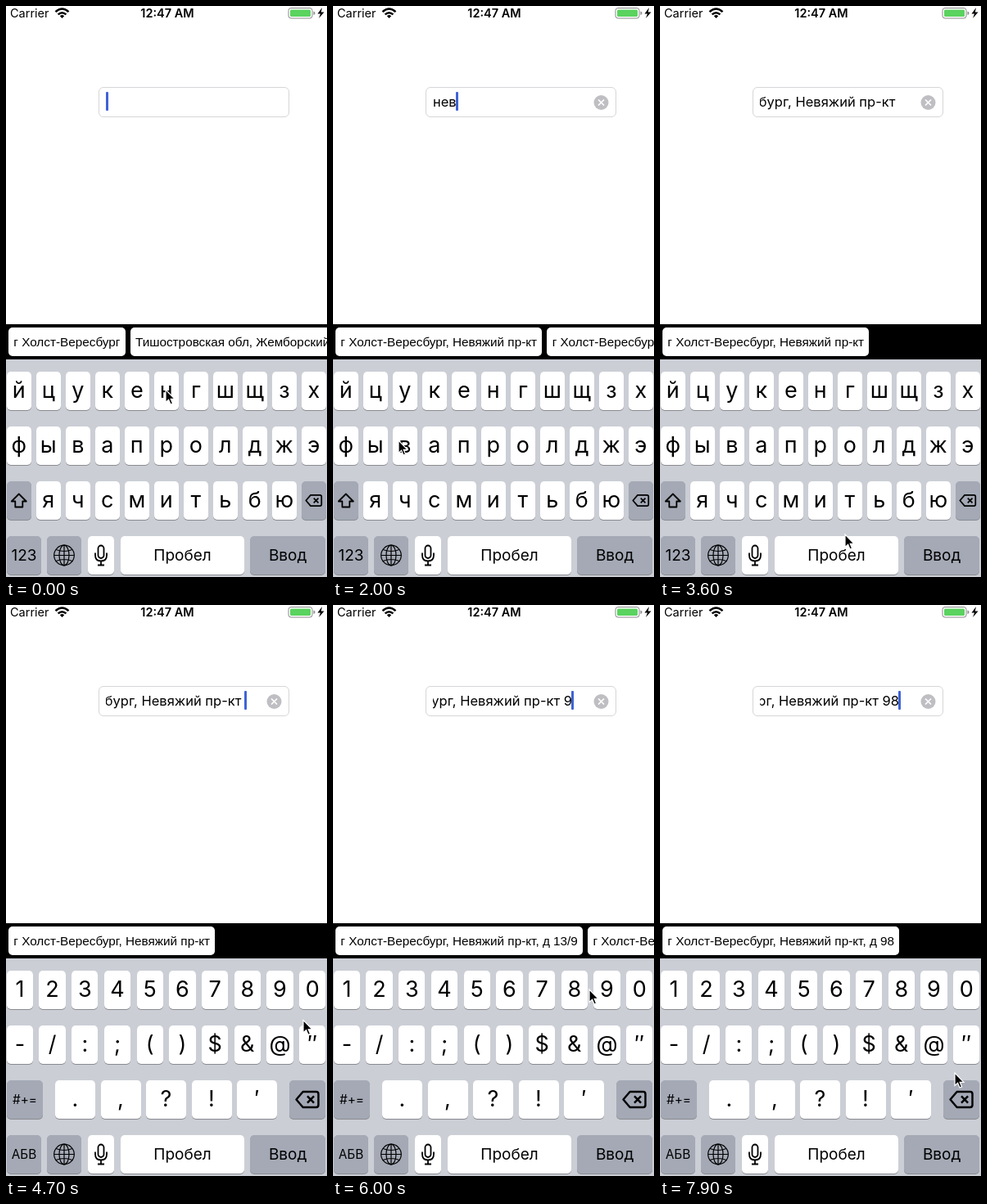
These frames come from a looping animation (392x698 px, 8 s). An HTML page:

```html
<!DOCTYPE html>
<html lang="ru">
<head>
<meta charset="utf-8">
<title>Address input</title>
<style>
html, body { margin: 0; width: 100%; height: 100%; overflow: hidden; background: #fff; }
#stage { position: relative; width: 392px; height: 698px; overflow: hidden; color: #000; font-family: Inter, Roboto, sans-serif; }
#stage div, #stage svg { position: absolute; box-sizing: border-box; white-space: pre; }
#stage svg { left: 0; top: 0; overflow: visible; }
.status { top: 0; line-height: 18px; font-size: 14.5px; }
#field { left: 113px; top: 98.5px; width: 233px; height: 37.5px; border: 1px solid #d6d6d8; border-radius: 6px; }
#clip { left: 122px; top: 104px; width: 171px; height: 27px; overflow: hidden; }
#typed { top: 0; line-height: 27px; font-size: 16.5px; }
#caret { top: 105px; width: 3px; height: 23px; border-radius: 1px; background: #3f63d6; }
#bar { left: 0; top: 389px; width: 392px; height: 43px; background: #000; overflow: hidden; }
#chips { left: 3px; top: 4px; display: flex; gap: 6px; }
#stage .chip { position: static; flex: none; height: 35px; padding: 0 6.3px; border-radius: 5px; background: #fff; line-height: 36px; font-family: "Liberation Sans", Arial, sans-serif; font-size: 15.3px; }
#board { left: 0; top: 432px; width: 392px; height: 266px; background: #cbced5; }
#letters, #numbers, #common { left: 0; top: 0; }
.key { height: 47px; line-height: 45px; text-align: center; font-size: 27px; background: #fff; border-radius: 5px; box-shadow: 0 1px #898b90; }
.key.gray { background: #a4a9b5; }
.key.word { line-height: 47px; font-size: 19px; }
.key.small { line-height: 48px; font-size: 15.3px; }
#popText { font: 38px Inter, sans-serif; text-anchor: middle; }
</style>
</head>
<body>
<div id="stage">
  <div class="status" style="left:5px">Carrier</div>
  <div class="status" style="left:97px;width:200px;text-align:center;font-weight:600">12:47 AM</div>
  <svg width="392" height="140">
    <g fill="none" stroke="#000" stroke-width="2.5">
      <path d="M60.5 7.2Q68.5 -.2 76.5 7.2M63.6 10.4Q68.5 6 73.4 10.4"/>
      <path d="M68.5 15L65.8 12.2Q68.5 10 71.2 12.2Z" fill="#000" stroke="none"/>
    </g>
    <rect x="345" y="2.5" width="29" height="12.5" rx="3" fill="#fff" stroke="#8b8b8b"/>
    <rect x="347" y="4.5" width="25" height="8.5" rx="1.5" fill="#5ad35f"/>
    <path d="M375.5 6.5q2 .5 2 2.2t-2 2.2z" fill="#8b8b8b"/>
    <path d="M386 2L380.5 9.5H384L382 15L388.5 7.5H384.8Z"/>
  </svg>
  <div id="field"></div>
  <div id="clip"><div id="typed"></div></div>
  <div id="caret"></div>
  <svg id="clear" width="392" height="140">
    <circle cx="327.5" cy="118" r="9" fill="#bfbfc3"/>
    <path d="M324 114.5l7 7m0-7l-7 7" stroke="#fff" stroke-width="1.7"/>
  </svg>
  <div id="bar"><div id="chips"></div></div>
  <div id="board">
    <div id="letters"></div>
    <div id="numbers"></div>
    <div id="common"></div>
  </div>
  <svg id="popup" width="392" height="698" style="filter:drop-shadow(0 1px 2px #0007)">
    <path id="popShape" fill="#fff"/><text id="popText"></text>
  </svg>
  <svg id="pointer" width="14" height="20">
    <path d="M0 0V15.5L3.6 12.2L6 18L8.6 16.9L6.2 11.3H11Z" stroke="#fff" stroke-width="1.2"/>
  </svg>
</div>
<script>
const $ = id => document.getElementById(id);
const LOOP = 8000;
const CITY = 'г Холст-Вересбург', STREET = CITY + ', Невяжий пр-кт';

// Keyboard: rows are 67px apart, measured from the board's top
const keys = {};
function addKey(group, label, row, x, w, style = '', icon = '') {
  const el = document.createElement('div');
  const y = 15 + row * 67;
  el.className = 'key ' + style;
  el.style.cssText = `left:${x}px;top:${y}px;width:${w}px`;
  if (icon) el.innerHTML = `<svg width="${w}" height="47" viewBox="${-w / 2} -23.5 ${w} 47" fill="none" stroke="#000" stroke-width="1.8" stroke-linejoin="round">${icon}</svg>`;
  else el.textContent = label;
  $(group).append(el);
  keys[label] = { el, x, y: y + 432, w };
}
const addRow = (group, labels, row, x, pitch, w) =>
  [...labels].forEach((c, i) => addKey(group, c, row, x + i * pitch, w));

const eraser = s => `<g transform="scale(${s})"><path d="M-10 0L-4 -7H8Q10 -7 10 -5V5Q10 7 8 7H-4ZM0 -3l6 6m0-6l-6 6"/></g>`;
const shift = '<path d="M0 -8L9 1H4.5V8H-4.5V1H-9Z"/>';
const globe = '<g stroke-width="1.2"><circle r="12.3"/><ellipse rx="6" ry="12.3"/><path d="M0 -12.3V12.3M-12.3 0H12.3M-10 -7Q0 -3 10 -7M-10 7Q0 3 10 7"/></g>';
const mic = '<rect x="-3.5" y="-12" width="7" height="15.5" rx="3.5"/><path d="M-7 -3V0Q-7 7 0 7T7 0V-3M0 7V12M-4 12H4"/>';

addRow('letters', 'йцукенгшщзх', 0, 1, 36, 29.6);
addRow('letters', 'фывапролджэ', 1, 1, 36, 29.6);
addRow('letters', 'ячсмитьбю', 2, 37, 36, 29.6);
addKey('letters', 'shift', 2, 1, 29.6, 'gray', shift);
addKey('letters', 'erase', 2, 361, 29.6, 'gray', eraser(.95));
addKey('letters', '123', 3, 1, 42, 'gray word');
addRow('numbers', '1234567890', 0, .7, 39.7, 32.4);
addRow('numbers', '-/:;()$&@″', 1, .7, 39.7, 32.4);
addRow('numbers', '.,?!′', 2, 60, 55.5, 49);
addKey('numbers', '#+=', 2, 1, 44, 'gray small');
addKey('numbers', 'erase2', 2, 346, 44, 'gray', eraser(1.35));
addKey('numbers', 'АБВ', 3, 1, 42, 'gray small');
addKey('common', 'globe', 3, 50, 42, 'gray', globe);
addKey('common', 'mic', 3, 100, 32, '', mic);
addKey('common', 'Пробел', 3, 140, 151, 'word');
addKey('common', 'Ввод', 3, 298, 92, 'gray word');

// Timelines: [start, value...]
const edits = [[-300, ''], [800, 'н'], [1100, 'не'], [1780, 'нев'], [2900, STREET + ' '],
  [4250, STREET + ' '], [5550, STREET + ' 9'], [6700, STREET + ' 98']];
const suggestions = [
  [0, CITY, 'Тишостровская обл, Жемборский р-н'],
  [1000, CITY + ', Новодолменская наб', CITY + ', Ново'],
  [1900, STREET, CITY + ', Невелочная ул'],
  [3200, STREET],
  [5900, STREET + ', д 13/9', STREET + ', д 19'],
  [7000, STREET + ', д 98']];
const presses = [[700, 'н', 830], [1000, 'е', 1130], [1650, 'в', 1790], [5400, '9', 5560], [6550, '8', 6710]];
const path = [[0, 195, 469], [840, 195, 469], [1000, 155, 464], [1330, 155, 464],
  [1640, 80, 531], [2050, 80, 531], [2450, 196, 402], [2700, 197, 403], [3300, 197, 403],
  [3600, 226, 646], [3750, 226, 646], [4050, 18, 668], [4250, 18, 668], [4620, 363, 507],
  [4800, 363, 508], [5200, 333, 466], [5750, 333, 466], [6000, 313, 470], [6250, 293, 468],
  [6700, 293, 468], [6900, 345, 648], [7100, 364, 568], [7600, 359, 571], [7900, 360, 572]];

const clamp = v => Math.max(0, Math.min(1, v));
const current = (list, t) => list.findLast(item => item[0] <= t);

function pointerAt(t) {
  const i = path.findLastIndex(p => p[0] <= t);
  const a = path[i], b = path[i + 1] || a;
  const k = clamp((t - a[0]) / (b[0] - a[0] || 1)), e = k * k * (3 - 2 * k);
  return [a[1] + (b[1] - a[1]) * e, a[2] + (b[2] - a[2]) * e];
}

function drawPopup(label) {
  $('popup').style.display = label ? '' : 'none';
  if (!label) return;
  const { x, y, w } = keys[label], r = w + 13;
  $('popShape').setAttribute('transform', `translate(${x} ${y})`);
  $('popShape').setAttribute('d', `M5 47H${w - 5}Q${w} 47 ${w} 42V8C${w} -6 ${r} -6 ${r} -20V-48Q${r} -57 ${w + 4} -57H-4Q-13 -57 -13 -48V-20C-13 -6 0 -6 0 8V42Q0 47 5 47Z`);
  $('popText').setAttribute('x', x + w / 2);
  $('popText').setAttribute('y', y - 17);
  $('popText').textContent = label;
}

let shown;
function showChips(list) {
  if (shown === list) return;
  shown = list;
  $('chips').replaceChildren(...list.slice(1).map(text => {
    const chip = document.createElement('div');
    chip.className = 'chip';
    chip.textContent = text;
    return chip;
  }));
}

function render(t) {
  const [since, text] = current(edits, t);
  $('typed').textContent = text;
  const width = $('typed').getBoundingClientRect().width;
  $('typed').style.left = Math.min(0, 170 - width) + 'px';
  $('caret').style.left = Math.floor(122 + Math.min(width, 169.5)) + 'px';
  const blink = (t - since) % 1000;
  $('caret').style.opacity = blink < 800 ? 1 - clamp((blink - 500) / 150) : clamp((blink - 900) / 100);
  $('clear').style.display = text ? '' : 'none';

  showChips(current(suggestions, t));
  $('chips').firstChild.style.background = t >= 2900 && t < 3200 ? '#d9d9d9' : '';

  const numeric = t >= 4200;
  $('letters').style.display = numeric ? 'none' : '';
  $('numbers').style.display = numeric ? '' : 'none';
  keys['123'].el.style.background = t >= 4080 && !numeric ? '#fff' : '';
  const press = current(presses, t);
  drawPopup(press && t < press[2] ? press[1] : '');

  const [x, y] = pointerAt(t);
  $('pointer').style.transform = `translate(${x}px, ${y}px)`;
}

function tick() {
  render(performance.now() % LOOP);
  requestAnimationFrame(tick);
}
tick();
</script>
</body>
</html>
```
